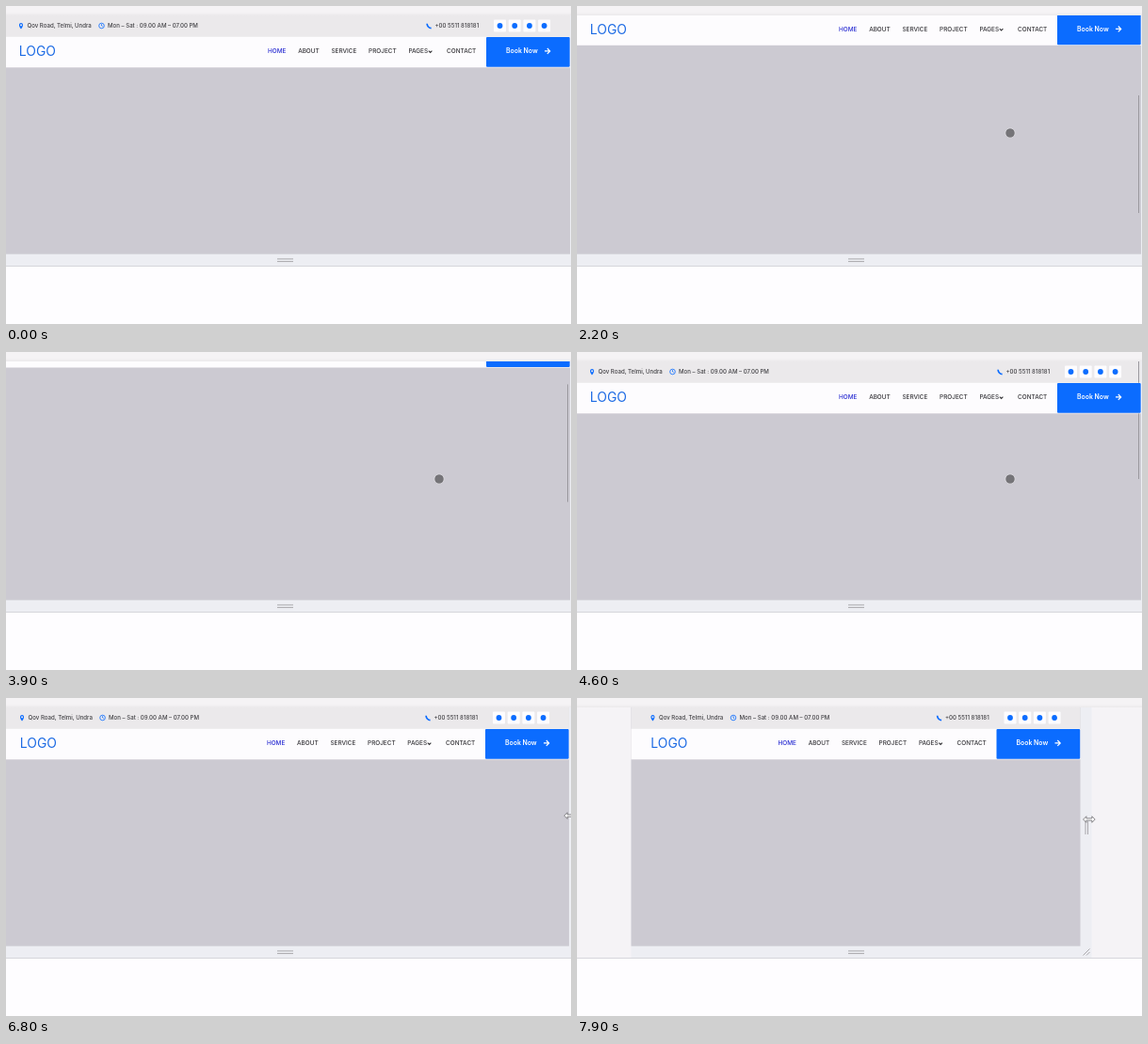
These frames come from a looping animation (600x338 px, 8000 ms). An HTML page:

```html
<!DOCTYPE html>
<html lang="en">
<head>
<meta charset="utf-8">
<title>Sticky navigation bar</title>
<style>
  html, body { margin: 0; width: 100%; height: 100%; overflow: hidden; background: #fefdff; }
  svg { display: block; width: 600px; height: 338px; font-family: Inter, sans-serif; }
  .small { font-size: 6.1px; font-weight: 500; fill: #434246; }
  .menu { font-size: 6.4px; font-weight: 500; fill: #353438; }
  .menu .active { fill: #2b2fd2; }
  .drop { font-size: 7.3px; fill: #454448; }
  .blue { fill: #0b6cff; }
  .line { fill: none; stroke: #0b6cff; }
  .grip { fill: none; stroke: #a9a8ac; }
</style>
</head>
<body>
<svg viewBox="0 0 600 338">
  <defs>
    <linearGradient id="shade" x2="0" y2="1">
      <stop offset=".7" stop-color="#f5f3f5"/><stop offset="1" stop-color="#ebe9eb"/>
    </linearGradient>
  </defs>
  <rect width="600" height="276" fill="#f5f3f6"/>
  <rect id="frame" y="10" height="266" fill="#edeef3"/>
  <rect class="page" y="10" height="253.7" fill="#cccad2"/>

  <g id="topbar">
    <rect class="page" y="10" height="23" fill="#ebe9eb"/>
    <g class="left small">
      <path class="blue" fill-rule="evenodd" d="M16 24.4c-3-3.3-2.4-6.4 0-6.4s3 3.1 0 6.4zM16 19.2a1 1 0 1 0 .01 0z"/>
      <text x="22.5" y="23">Qov Road, Telmi, Undra</text>
      <g class="line" stroke-width=".8"><circle cx="101.5" cy="21" r="2.8"/><path d="M101.5 19.2V21l1.2 .9"/></g>
      <text x="108" y="23">Mon – Sat : 09.00 AM – 07.00 PM</text>
    </g>
    <g class="right small">
      <path class="line" stroke-width="1.7" d="M447.1 18.8q.3 4.2 4.5 4.9"/>
      <text x="455.5" y="23.3">+00 5511 818181</text>
      <g id="social"></g>
    </g>
  </g>

  <rect id="thumb" x="596" width="1" height="125" fill="#9b999e"/>

  <g id="nav">
    <rect class="page" height="32.5" fill="#fdfcfe"/>
    <g class="left"><text x="13.8" y="20.5" font-size="13.9" fill="#1d6be4">LOGO</text></g>
    <g class="right">
      <text id="menu" class="menu" x="278" y="17.4"></text>
      <path id="chevron" d="M448.8 14.8l1.8 1.8 1.8-1.8" fill="none" stroke-width="1.1"/>
      <rect class="blue" x="510" y=".2" width="88.7" height="31.8" rx="1"/>
      <text x="531" y="17.6" font-size="6.9" font-weight="600" fill="#fff">Book Now</text>
      <path d="M572 15.1h5.5m-2.7-2.9l2.9 2.9-2.9 2.9" fill="none" stroke="#fff" stroke-width="1.2"/>
      <g id="drop" class="drop">
        <rect x="425" y="32.5" width="68.5" height="61" rx="1" fill="#fdfcfe"/>
      </g>
    </g>
  </g>

  <rect width="600" height="10" fill="url(#shade)"/>
  <path class="grip" d="M288 268.9h17M288 271.6h17"/>
  <path class="grip right" d="M604.5 131v14M607 131v14M602 273.5l7-7M605.5 273.5l3.5-3.5"/>
  <path d="M0 276.5h600" stroke="#d6d6db"/>
  <circle id="touch" r="5.2" fill="#757478" stroke="#e4e3e7" stroke-width=".8"/>
  <path id="resize" fill="#fff" stroke="#6a696d" stroke-width=".8"
        d="M-6.3 0l3.3-3.3v2.2h6v-2.2l3.3 3.3-3.3 3.3v-2.2h-6v2.2z"/>
</svg>
<script>
const LOOP = 8000, STEP = 100, MAX_SCROLL = 246;
const $ = id => document.getElementById(id);
const all = selector => document.querySelectorAll(selector);
const set = (el, attrs) => { for (const k in attrs) el.setAttribute(k, attrs[k]); };
const move = (el, x, y) => set(el, { transform: `translate(${x} ${y})` });
const repeat = (items, template) => items.map(template).join('');

$('menu').innerHTML = repeat(['HOME', 'ABOUT', 'SERVICE', 'PROJECT', 'PAGES', 'CONTACT'], (label, i) =>
  `<tspan dx="${i === 0 ? 0 : label === 'CONTACT' ? 20 : 12.8}" ${i ? '' : 'class="active"'}>${label}</tspan>`);
$('drop').innerHTML += repeat(['Products', 'Our Team', 'Testimonial', 'Our Works'], (label, i) =>
  `<text x="431" y="${44.3 + i * 13.9}">${label}</text>`);
$('social').innerHTML = repeat([0, 1, 2, 3], i =>
  `<g transform="translate(${524.5 + i * 15.7} 21)">
     <rect x="-6.5" y="-6.5" width="13" height="13" rx="1" fill="#fdfcfe"/><circle class="blue" r="2.9"/>
   </g>`);
const pages = $('menu').children[4];

function draw(now) {
  const t = Math.floor(now % LOOP / STEP) * STEP;
  const part = (from, to) => Math.min(1, Math.max(0, (t - from) / (to - from)));
  const ramp = (from, to) => { const u = part(from, to); return u * u * (3 - 2 * u); };
  const pulse = (start, shown, hide, end) => ramp(start, shown) - ramp(hide, end);

  // Down, a short wheel back, then up to the top.
  const scroll = MAX_SCROLL * pulse(1200, 1845, 3300, 4140) - 76 * Math.sin(Math.PI * part(1900, 2500)) ** 2;
  const stick = pulse(1650, 1950, 3550, 3850);
  const drop = pulse(5050, 5250, 5650, 5800);
  const shrink = 64.5 * part(6600, 7900) ** 2.2;

  // Enter, hover the menu, leave the list, then drag the frame edge.
  const enter = ramp(900, 1050), hover = ramp(4900, 5150), toEdge = ramp(5800, 6500);
  const x = 606 - 146 * enter - 23 * hover - 26 * ramp(5400, 5600) + 189 * toEdge - shrink * .87;
  const y = 140 - 5 * enter - 87 * hover + 30 * ramp(5200, 5600) + 47 * toEdge + shrink / 16;
  const resizing = t > 6500;

  all('.page').forEach(el => set(el, { x: shrink - 7, width: 606 - 2 * shrink }));
  set($('frame'), { x: shrink - 7, width: 618 - 2 * shrink });
  all('.left').forEach(el => move(el, shrink, 0));
  all('.right').forEach(el => move(el, -shrink, 0));

  move($('topbar'), 0, -scroll);
  move($('nav'), 0, Math.max(32.8 - scroll, 9.3 - 44 * (1 - stick)));
  set($('thumb'), { y: 10 + scroll / 2, opacity: pulse(1000, 1100, 4800, 5000) });

  set($('drop'), { opacity: drop });
  pages.classList.toggle('active', drop > .3);
  set($('chevron'), { stroke: drop > .3 ? '#2b2fd2' : '#353438' });

  move($('touch'), x, y);
  move($('resize'), x, y);
  set($('touch'), { opacity: enter > 0 && !resizing ? 1 : 0 });
  set($('resize'), { opacity: resizing ? 1 : 0 });
  requestAnimationFrame(() => draw(performance.now() - start));
}
const start = performance.now();
draw(0);
</script>
</body>
</html>
```
